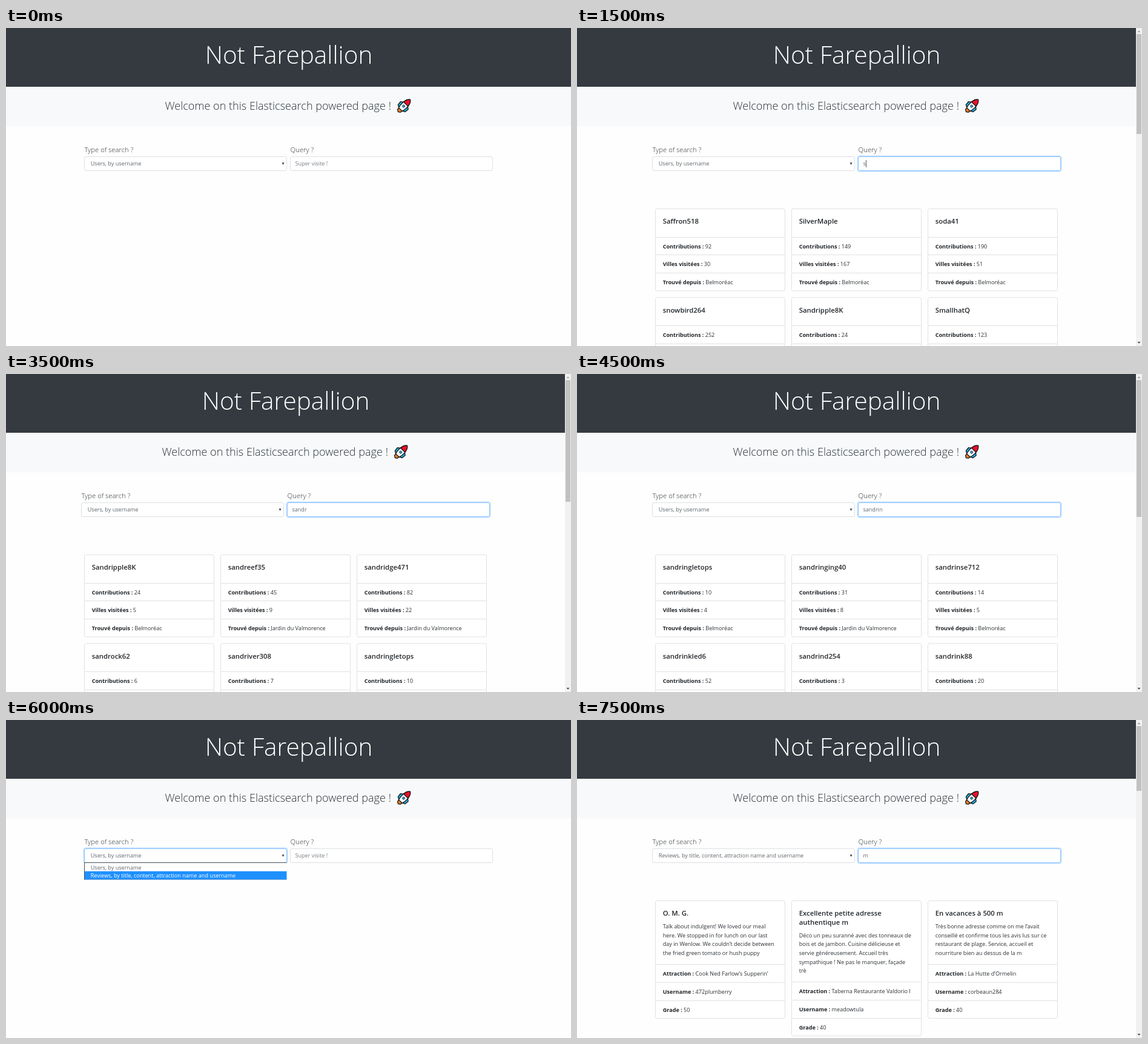
An HTML page with a canvas that plays this animation: 933x525 px, repeating every 8000 ms.

```html
<!DOCTYPE html>
<html lang="en">
<head>
<meta charset="utf-8">
<title>Search page</title>
<style>
  html, body { margin: 0; width: 100%; height: 100%; overflow: hidden; background: #fefefe; }
  canvas { display: block; }
</style>
</head>
<body>
<canvas id="stage" width="933" height="525"></canvas>
<script>
const ctx = document.getElementById('stage').getContext('2d');
const FAMILY = '"Open Sans", "Noto Sans", sans-serif';
const LOOP = 8000;
const LINE = 14.6, ROW = 29.8;
const INK = '#2b3035', FIELD = '#5f666c', BORDER = '#dcdfe2';
const KINDS = ['Users, by username', 'Reviews, by title, content, attraction name and username'];
const PLACES = ['Belmoréac', 'Jardin du Valmorence'];

// name, contributions, cities, place
const users = [
  ['Saffron518', 92, 30, 0], ['SilverMaple', 149, 167, 0], ['soda41', 190, 51, 0],
  ['snowbird264', 252, 48, 0], ['Sandripple8K', 24, 5, 0], ['SmallhatQ', 123, 37, 0],
  ['sailcloth77', 61, 18, 0], ['saltmarsh3', 35, 12, 1], ['sagegreen81', 118, 40, 0],
  ['satchel506', 17, 6, 1], ['sanctum62', 54, 21, 0], ['sandcastle5', 73, 19, 1],
  ['sandpiper93', 28, 11, 0], ['sandpaper12', 9, 4, 1], ['sandreef35', 45, 9, 1],
  ['sandridge471', 82, 22, 1], ['sandrock62', 6, 3, 0], ['sandriver308', 7, 2, 1],
  ['sandringletops', 10, 4, 0], ['sandringing40', 31, 8, 1], ['sandrinse712', 14, 5, 0],
  ['sandrinkled6', 52, 16, 1], ['sandrind254', 3, 1, 0], ['sandrink88', 20, 7, 0]
];

const reviews = [
  {
    title: ['O. M. G.'],
    body: ['Talk about indulgent! We loved our meal', 'here. We stopped in for lunch on our last',
      'day in Wenlow. We couldn’t decide between', 'the fried green tomato or hush puppy'],
    rows: [['Attraction', 'Cook Ned Farlow’s Supperin’'], ['Username', '472plumberry'], ['Grade', 50]]
  },
  {
    title: ['Excellente petite adresse', 'authentique m'],
    body: ['Déco un peu suranné avec des tonneaux de', 'bois et de jambon. Cuisine délicieuse et',
      'servie généreusement. Accueil très', 'sympathique ! Ne pas le manquer, façade', 'trè'],
    rows: [['Attraction', 'Taberna Restaurante Valdorio I'], ['Username', 'meadowtula'], ['Grade', 40]]
  },
  {
    title: ['En vacances à 500 m'],
    body: ['Très bonne adresse comme on me l’avait', 'conseillé et confirme tous les avis lus sur ce',
      'restaurant de plage. Service, accueil et', 'nourriture bien au dessus de la m'],
    rows: [['Attraction', 'La Hutte d’Ormelin'], ['Username', 'corbeaun284'], ['Grade', 40]]
  }
];

// Each step takes over at its time; thumb is the lower end of the scrollbar handle.
const steps = [
  { at: 0 },
  { at: 500, focus: 'kind' },
  { at: 1000, focus: 'query' },
  { at: 1500, focus: 'query', query: 's', thumb: 175, caret: true },
  { at: 2000, focus: 'query', query: 'sa', thumb: 175 },
  { at: 2500, focus: 'query', query: 'san', thumb: 175 },
  { at: 3000, focus: 'query', query: 'sand', thumb: 175 },
  { at: 3500, focus: 'query', query: 'sandr', thumb: 211 },
  { at: 4000, focus: 'query', query: 'sandri', thumb: 236 },
  { at: 4500, focus: 'query', query: 'sandrin', thumb: 236 },
  { at: 5000, focus: 'query' },
  { at: 5500, focus: 'kind', menu: 0 },
  { at: 6000, focus: 'kind', menu: 1 },
  { at: 6500, focus: 'kind', kind: 1 },
  { at: 7000, focus: 'query', kind: 1 },
  { at: 7500, focus: 'query', kind: 1, query: 'm', thumb: 117 }
];

function rect(x, y, w, h, color) {
  ctx.fillStyle = color;
  ctx.fillRect(x, y, w, h);
}

function text(str, x, y, size, weight, color, align = 'left') {
  ctx.font = `${weight} ${size}px ${FAMILY}`;
  ctx.fillStyle = color;
  ctx.textAlign = align;
  ctx.fillText(str, x, y);
  return ctx.measureText(str).width;
}

function small(str, x, y, color = INK, weight = 400) {
  return text(str, x, y, 9.08, weight, color);
}

function frame(x, y, w, h, color, width = 1, r = 2.5) {
  ctx.beginPath();
  ctx.roundRect(x, y, w, h, r);
  ctx.strokeStyle = color;
  ctx.lineWidth = width;
  ctx.stroke();
}

function shape(points, color) {
  ctx.beginPath();
  points.forEach(([x, y]) => ctx.lineTo(x, y));
  ctx.closePath();
  ctx.fillStyle = color;
  ctx.fill();
}

function rocket(x, y) {
  const paint = (path, color) => {
    const p = new Path2D(path);
    ctx.fillStyle = color;
    ctx.fill(p);
    ctx.stroke(p);
  };
  ctx.save();
  ctx.translate(x, y);
  ctx.rotate(Math.PI / 4);
  ctx.strokeStyle = '#111';
  ctx.lineWidth = 1.3;
  ctx.lineJoin = 'round';
  paint('M-4 7L-3.2 11.5L0 13.5L3.2 11.5L4 7Z', '#f7832b');
  paint('M-4 -5L-9 -1L-8.2 5.5L-4 7.5Z', '#22b8ee');
  paint('M4 -5L9 -1L8.2 5.5L4 7.5Z', '#22b8ee');
  paint('M-5 -6L5 -6Q6 2 4 8L-4 8Q-6 2 -5 -6Z', '#f4f6f7');
  paint('M-5 -4.5Q-5 -11.5 0 -15Q5 -11.5 5 -4.5Z', '#e8112d');
  ctx.beginPath();
  ctx.arc(0, 0.5, 1.9, 0, Math.PI * 2);
  ctx.fillStyle = '#22b8ee';
  ctx.fill();
  ctx.lineWidth = 0.8;
  ctx.stroke();
  ctx.restore();
}

function field(x, focused) {
  rect(x, 212, 335, 24, '#fff');
  if (focused) frame(x - 0.7, 211.3, 336.4, 25.4, '#bfdeff', 1.5, 3.5);
  frame(x + 0.5, 212.5, 334, 23, focused ? '#8ac2ff' : BORDER);
}

function menu(active) {
  rect(129, 235, 334.5, 29, '#fff');
  rect(129, 235, 334.5, 1, '#4a4f55');
  rect(129, 235, 1, 29, '#4a4f55');
  rect(129, 263.3, 334.5, 0.7, '#8a9097');
  rect(130, active ? 249.7 : 236, 333.5, 13.6, '#1e90ff');
  KINDS.forEach((label, i) => small(label, 139.7, 246.6 + i * 13.6, i === active ? '#fff' : FIELD));
}

function card(x, y, { title, body, rows }) {
  const head = 32 + LINE * (title.length + body.length);
  const left = x + 12.7;
  const bodyTop = y + 46.2 + LINE * (title.length - 1);
  rect(x, y, 215, head + ROW * rows.length, '#fff');
  frame(x + 0.5, y + 0.5, 214, head + ROW * rows.length - 0.5, '#e0e1e2');
  title.forEach((line, i) => text(line, left, y + 25 + i * LINE, 11.35, 600, '#212529'));
  body.forEach((line, i) => small(line, left, bodyTop + i * LINE));
  rows.forEach(([label, value], i) => {
    const top = y + head + i * ROW;
    rect(x, Math.round(top), 215, 1, '#e0e1e2');
    const w = small(label + ' : ', left, top + 19, '#212529', 700);
    small(String(value), left + w, top + 19);
  });
}

function userCard([name, count, cities, place]) {
  return {
    title: [name],
    body: [],
    rows: [['Contributions', count], ['Villes visitées', cities], ['Trouvé depuis', PLACES[place]]]
  };
}

function results(step) {
  const found = step.kind
    ? reviews
    : users.filter(u => u[0].toLowerCase().startsWith(step.query)).slice(0, 6).map(userCard);
  found.forEach((item, i) => card(129 + (i % 3) * 225, 298 + Math.floor(i / 3) * 146.5, item));
}

function scrollbar(end) {
  rect(923, 0, 10, 525, '#f1f1f1');
  rect(924, 10, 8, end - 10, '#c1c1c1');
  shape([[925.5, 7], [928, 4], [930.5, 7]], '#a3a3a3');
  shape([[925.5, 518], [928, 521], [930.5, 518]], '#505050');
}

function draw(step) {
  const dx = step.query ? -5 : 0;
  rect(0, 0, 933, 525, '#fefefe');
  rect(0, 0, 933, 97, '#343a40');
  rect(0, 97, 933, 65.5, '#f7f9fb');

  ctx.save();
  ctx.translate(dx, 0);
  text('Not Farepallion', 467, 59.3, 40.5, 300, '#fff', 'center');
  text('Welcome on this Elasticsearch powered page !', 262.5, 135, 18.08, 300, INK);
  rocket(657, 128.8);
  text('Type of search ?', 129.4, 204.6, 11.3, 300, INK);
  text('Query ?', 469.6, 204.6, 11.3, 300, INK);

  field(129, step.focus === 'kind');
  small(KINDS[step.kind || 0], 139.7, 227.4, FIELD);
  shape([[455.6, 222.3], [459.6, 222.3], [457.6, 226]], '#3d4246');

  field(469, step.focus === 'query');
  const w = small(step.query || 'Super visite !', 477.4, 227.4, step.query ? FIELD : '#777e85');
  if (step.caret) rect(477.4 + w + 0.3, 218, 0.8, 12, '#333');
  if (step.menu !== undefined) menu(step.menu);
  ctx.restore();

  if (step.query) {
    results(step);
    scrollbar(step.thumb);
  }
}

const start = performance.now();
function tick() {
  const t = (performance.now() - start) % LOOP;
  draw(steps.findLast(s => s.at <= t));
  requestAnimationFrame(tick);
}
tick();
</script>
</body>
</html>
```
